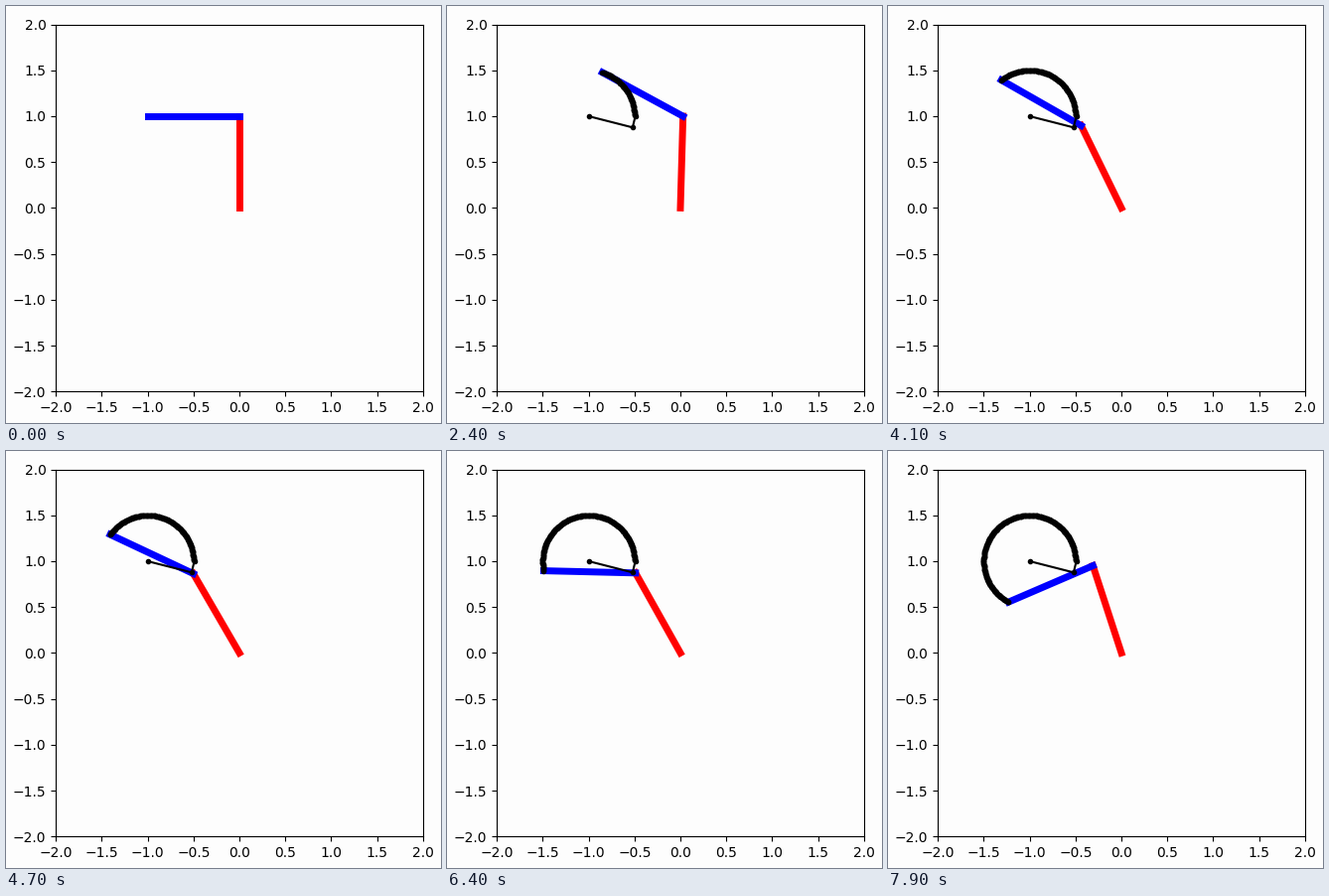
These frames come from a looping animation (438 px wide and 420 px high, 8000 ms). A matplotlib script:

```python
import numpy as np
import matplotlib.pyplot as plt
from matplotlib.animation import FuncAnimation

W, H, DPI = 438, 420, 100
FRAMES, STEP_MS, HOLD = 80, 100, 3
CENTER, RADIUS = np.array([-1.0, 1.0]), 0.5

# sweep of the hand round the circle: step number -> degrees
STEPS = [0, 9, 17, 26, 35, 38, 44, 53, 61, 71, 76]
SWEEP = [0, 32, 60, 88.2, 117.7, 128, 144.5, 166.9, 192, 226, 242.8]


def unit(a):
    return np.array([np.cos(a), np.sin(a)])


def solve(tip):
    """Absolute link angles that put the hand on tip."""
    heading = np.arctan2(tip[1], tip[0])
    bend = np.arccos(np.hypot(*tip) / 2)
    return heading - bend, heading + bend


def newton_step(tip, goal):
    """Hand position after one Jacobian step towards the goal."""
    a, b = solve(tip)
    err, s = goal - tip, np.sin(b - a)
    return unit(a + err @ unit(b) / s) + unit(b - err @ unit(a) / s)


def approach():
    """Jump from the rest pose to the start of the circle."""
    points = [CENTER]
    for _ in range(2):
        points.append(newton_step(points[-1], CENTER + [RADIUS, 0]))
    return np.array(points)


def hand_path(step):
    """All hand positions up to a step, about one per degree."""
    degrees = np.interp(step, STEPS, SWEEP)
    angles = np.radians(np.linspace(0, degrees, int(degrees) + 1)[1:])
    arc = CENTER + RADIUS * unit(angles).T
    return np.vstack([INTRO, arc])


INTRO = approach()

plt.rcParams["font.family"] = "DejaVu Sans"
PAPER = "#fdfdfd"
SIDE = 369.6
fig = plt.figure(figsize=(W / DPI, H / DPI), dpi=DPI, facecolor=PAPER)
ax = fig.add_axes([50.2 / W, 31.8 / H, SIDE / W, SIDE / H], facecolor=PAPER)
ticks = np.arange(-2, 2.1, 0.5)
ax.set(xlim=(-2, 2), ylim=(-2, 2), xticks=ticks, yticks=ticks)

upper, = ax.plot([], [], color="#ff0000", lw=5)
fore, = ax.plot([], [], color="#0000ff", lw=5)
trail, = ax.plot([], [], "k.-", lw=1.5, ms=6)


def draw(n):
    moving = n >= HOLD
    path = hand_path(n - HOLD) if moving else INTRO[:1]
    tx, ty = path[-1]
    ex, ey = unit(solve(path[-1])[0])
    upper.set_data([0, ex], [0, ey])
    fore.set_data([ex, tx], [ey, ty])
    trail.set_data(path[:, 0], path[:, 1])
    trail.set_visible(moving)
    return upper, fore, trail


def reset():
    return draw(0)


anim = FuncAnimation(fig, draw, frames=FRAMES, init_func=reset,
                     interval=STEP_MS, repeat=True, repeat_delay=0, blit=False)
plt.show()
```
